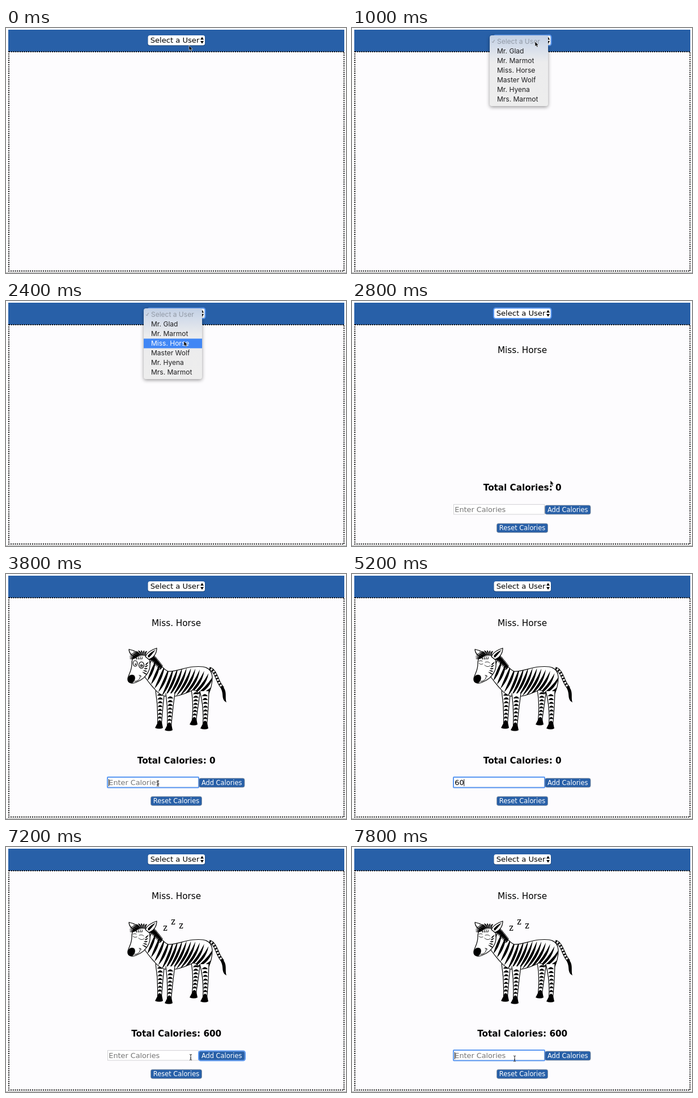
An HTML page for the animation above (8 s loop, 600 by 433 pixels).

```html
<!DOCTYPE html>
<html lang="en">
<head>
<meta charset="utf-8">
<title>Calorie tracker</title>
<style>
html, body { margin: 0; width: 100%; height: 100%; overflow: hidden; background: #fff; }
svg { display: block; width: 100vw; height: 100vh; }
text { font-family: "DejaVu Sans", Verdana, sans-serif; white-space: pre; }
.menu text { font: 12px Inter, Arial, sans-serif; }
.menu { filter: drop-shadow(0 2px 3px rgba(0, 0, 0, .4)); }
.z { font: 16px "Noto Serif", serif; }
.button { fill: #2860a8; stroke: #8d949e; stroke-width: .8; }
.label { font-size: 11.4px; fill: #fff; text-anchor: middle; }
.ring { fill: none; stroke: #5a98f2; stroke-width: 2; }
.line { fill: none; stroke: #000; stroke-linecap: round; }
.skin { fill: #fff; stroke: #000; stroke-width: 1.2; stroke-linejoin: round; }
</style>
</head>
<body>
<svg viewBox="0 0 600 433" preserveAspectRatio="none">
  <defs>
    <linearGradient id="frost" x1="0" y1="0" x2="0" y2="1">
      <stop offset="0" stop-color="#c3d0e4"/>
      <stop offset=".15" stop-color="#d3dcea"/>
      <stop offset=".38" stop-color="#ececed"/>
      <stop offset="1" stop-color="#ededed"/>
    </linearGradient>
    <clipPath id="bodyClip"><path id="bodyEdge"/></clipPath>
  </defs>
  <rect width="600" height="433" fill="#fff"/>
  <rect x="4" y="3" width="593" height="39" fill="#2860a8"/>
  <rect x="5" y="42" width="591.5" height="387.5" fill="#fdfcfe"/>
  <rect x="5" y="42" width="591.5" height="387.5" fill="none" stroke="#000" stroke-width="1.9" stroke-dasharray="1.9 1.9"/>
  <path d="M0 432.5H600" stroke="#aaa"/>

  <rect x="250" y="13.5" width="101.5" height="18" rx="3.5" fill="#000" opacity=".3"/>
  <rect x="250.5" y="13" width="100.5" height="17.5" rx="3.5" fill="#fff"/>
  <rect id="selectRing" class="ring" x="250" y="12.5" width="101.5" height="18.5" rx="3.5"/>
  <text x="254.7" y="26" font-size="13.1">Select a User</text>
  <path d="M343 20.5L346 15.8L349 20.5ZM343 23L346 27.7L349 23Z"/>

  <g id="page">
    <text x="300.5" y="92" font-size="15.2" text-anchor="middle">Miss. Horse</text>
    <g id="zebra"></g>
    <text id="total" x="300.7" y="335" font-size="15.2" font-weight="bold" text-anchor="middle"></text>
    <rect x="179.5" y="359.5" width="160" height="17.5" fill="#fff" stroke="#d2d2d6"/>
    <rect id="inputRing" class="ring" x="179" y="359" width="161" height="18.5" rx="1"/>
    <text id="entry" x="181.3" y="373.3" font-size="12.8"></text>
    <path id="caret" d="M0 362.5V375" stroke="#000" stroke-width=".9"/>
    <rect class="button" x="340.5" y="361" width="80.5" height="16" rx="3"/>
    <rect id="addRing" class="ring" x="340" y="360.5" width="82" height="17" rx="3.5"/>
    <text class="label" x="380.7" y="373.2">Add Calories</text>
    <rect class="button" x="255.5" y="393.2" width="90" height="16" rx="3"/>
    <text class="label" x="300.5" y="405.3">Reset Calories</text>
  </g>

  <g id="menu" class="menu"></g>
  <path id="arrow" d="M0 0V8.6L2 6.8L3.5 10L5.1 9.3L3.7 6.3H6.2Z" stroke="#fff" stroke-width=".6"/>
  <path id="beam" d="M-2 -5Q0 -5 0 -3.5Q0 -5 2 -5M0 -3.5V3.5M-2 5Q0 5 0 3.5Q0 5 2 5M-1 1.5H1" fill="none" stroke="#222"/>
</svg>
<script>
const LOOP = 8000, STEP = 200, ROW = 17;
const $ = id => document.getElementById(id);
const show = (id, on) => { $(id).style.display = on ? "" : "none"; };
const mix = (a, b, k) => a + (b - a) * k;
const ease = k => k * k * (3 - 2 * k);
const between = (t, a, b) => t >= a && t < b;
const shape = (cls, d) => `<path class="${cls}" d="${d}"/>`;

// Joins n path pieces; make gets the position k from 0 to 1.
const repeat = (n, make) => Array.from({ length: n }, (_, i) => make(i / (n - 1))).join("");

// Tapered stripe along a quadratic curve; w is its widest point.
function stripe(x1, y1, cx, cy, x2, y2, w) {
  const len = Math.hypot(x2 - x1, y2 - y1);
  const nx = (y1 - y2) / len * w, ny = (x2 - x1) / len * w;
  return `M${x1} ${y1}Q${cx + nx} ${cy + ny} ${x2} ${y2}Q${cx - nx} ${cy - ny} ${x1} ${y1}Z`;
}

// Tapering striped leg, open at the top so that it merges with the body.
function leg(x1, y1, x2, y2, bend) {
  const mx = (x1 + x2) / 2 + bend, my = (y1 + y2) / 2;
  const sides = `M${x1 - 8} ${y1}Q${mx - 4} ${my} ${x2 - 3.5} ${y2}H${x2 + 3.5}Q${mx + 4} ${my} ${x1 + 8} ${y1}`;
  const bands = repeat(8, k => {
    const u = mix(.14, .95, k), x = mix(mix(x1, mx, u), mix(mx, x2, u), u);
    const y = mix(y1, y2, u), half = mix(6.5, 3.5, Math.sqrt(u));
    return stripe(x - half, y + 1, x, y - 3, x + half, y + 1, 3.6);
  });
  const hoof = `M${x2 - 3} ${y2 - 2}H${x2 + 4}L${x2 + 6} ${y2 + 8}Q${x2} ${y2 + 11} ${x2 - 8} ${y2 + 8}Z`;
  return shape("skin", sides) + shape("", bands + hoof);
}

// Stripes sweep from the neck to the rump, leaning back towards the tail.
const coat = () => repeat(16, k => {
  const x1 = mix(257, 373, k), y1 = 147 + 18 * Math.min(1, 4 * k) + 24 * k ** 6;
  const x2 = mix(243, 338, k), y2 = 182 + 34 * Math.min(1, 3 * k);
  return stripe(x1, y1, (x1 + x2) / 2 + 9 * k, (y1 + y2) / 2 + 4, x2, y2, 4.5);
});

const mane = () => repeat(14, k => {
  const x = mix(251, 273, k), y = mix(145, 165, k ** 1.3);
  return stripe(x - 3, y + 5, x + 2, y, x + 3, y - 9 + 4 * k, 2.8);
});

const forelock = () => repeat(10, k => {
  const a = mix(2.9, 5.2, k), x = 239 + 22 * Math.cos(a), y = 147 + 12 * Math.sin(a);
  return stripe(mix(232, 246, k), 146, mix(x, 239, .4), y, x, y, 2.3);
});

const faceMarks = () =>
  repeat(5, k => stripe(mix(252, 248, k), mix(155, 178, k), 247, mix(160, 176, k), mix(246, 240, k), mix(161, 173, k), 2)) +
  repeat(4, k => stripe(mix(230, 241, k), 146, mix(230, 240, k), 149, mix(231, 239, k), 152, 1.6));

function drawZebra() {
  const body = `M258 147C270 156 277 169 286 172C300 173 312 166 330 164C350 162 363 165 364 182
    C364 196 361 203 358 211H340Q335 205 330 205C320 210 310 214 299 216H281
    C272 214 266 208 262 203C256 197 251 190 245 182Z`;
  const tail = "M359 167C372 171 372 192 383 202";
  const tailStroke = (color, width, dash = "none") =>
    `<path d="${tail}" fill="none" stroke="${color}" stroke-width="${width}" stroke-dasharray="${dash}"/>`;
  $("bodyEdge").setAttribute("d", body);
  $("zebra").innerHTML =
    leg(272, 206, 271, 264, 1) + leg(335, 204, 332, 258, 2) +
    tailStroke("#000", 5.5) + tailStroke("#fff", 3.5) + tailStroke("#000", 4.5, "2.5 3") +
    shape("", "M382 198C391 208 386 216 389 227C379 221 385 213 379 202Z") +
    shape("skin", body) +
    `<g clip-path="url(#bodyClip)">${shape("", coat())}</g>` +
    leg(290, 211, 288, 268, 1) + leg(350, 207, 351, 265, 3) +
    shape("", mane()) +
    shape("skin", "M230 147C221 145 217 139 217 133C226 135 233 139 235 145Z") +
    shape("skin", `M226 146C232 141 246 141 252 148C256 160 254 171 247 179
      C241 187 235 189 228 192C220 195 214 191 215 184C217 176 222 171 222 159C222 153 223 149 226 146Z`) +
    shape("skin", "M246 146C249 138 257 134 266 131C266 140 261 148 252 151Z") +
    shape("", "M250 145C253 140 258 137 264 134C260 139 257 143 252 148Z") +
    shape("", faceMarks() + forelock()) +
    shape("", "M215 186C215 180 221 176 226 179C230 183 227 191 222 193C217 193 214 190 215 186Z") +
    shape("line", "M227 190C234 189 237 185 237 180M235 179Q238 179 239 181") +
    `<g id="awake"><ellipse class="skin" cx="228" cy="158" rx="3.7" ry="5"/>
      <ellipse class="skin" cx="239" cy="161" rx="4.6" ry="5.6"/>
      <circle class="line" cx="239" cy="162" r="2.2"/>
      <circle cx="228.5" cy="159.5" r="1.3"/><circle cx="239" cy="162" r="1"/></g>
    <g id="asleep" stroke-width=".8">${shape("line", "M224 158Q227 161 231 159M234 161Q239 166 244 162M224 154Q227 152 230 154M235 156Q240 154 243 157")}</g>` +
    [0, 1, 2].map(i => `<text class="z" id="z${i}" x="${277 + 14 * i}" y="${148 - 2 * i - 9 * (i % 2)}">z</text>`).join("");
}

function drawMenu() {
  const users = ["Select a User", "Mr. Glad", "Mr. Marmot", "Miss. Horse", "Master Wolf", "Mr. Hyena", "Mrs. Marmot"];
  $("menu").innerHTML =
    `<rect x="243" y="13" width="103" height="125" rx="4" fill="url(#frost)"/>
     <rect id="hover" x="243" width="103" height="${ROW}" fill="#4187f5"/>
     <path d="M247 24L248.7 26L251.5 21" fill="none" stroke="#8c939e"/>` +
    users.map((name, i) => `<text x="256" y="${27.8 + i * ROW}">${name}</text>`).join("");
}

const moves = [
  { from: 0, to: 400, x: 323, y: 24 },
  { from: 1000, to: 2000, x: 314, y: 71 },
  { from: 2600, to: 2800, x: 350, y: 317 },
  { from: 2800, to: 3600, x: 268, y: 370 },
  { from: 6000, to: 6600, x: 365, y: 369 },
  { from: 6800, to: 7600, x: 287, y: 374 }
];

function pointerAt(t) {
  let x = 323, y = 31;
  for (const move of moves.filter(m => t > m.from)) {
    const k = ease(Math.min(1, (t - move.from) / (move.to - move.from)));
    x = mix(x, move.x, k);
    y = mix(y, move.y, k);
  }
  return [x, y];
}

function drawPointer(t, x, y) {
  const overInput = t >= 2800 && x > 179 && x < 340 && y > 359 && y < 378;
  const typing = between(t, 5000, 6000);
  show("arrow", !overInput && !typing);
  show("beam", overInput && !typing);
  for (const id of ["arrow", "beam"]) $(id).setAttribute("transform", `translate(${x} ${y})`);
}

function drawInput(t) {
  const keys = [5000, 5200, 5600];
  const typed = t < 7000 ? "600".slice(0, keys.filter(k => t >= k).length) : "";
  const focused = between(t, 3600, 6800) || t >= 7600;
  const lastInput = [3600, ...keys, 7600].filter(k => t >= k).pop();
  $("entry").textContent = typed || "Enter Calories";
  $("entry").setAttribute("fill", typed ? "#000" : "#757575");
  $("caret").setAttribute("transform", `translate(${181.5 + typed.length * 8.14} 0)`);
  show("caret", focused && Math.floor((t - lastInput) / 500) % 2 === 0);
  show("inputRing", focused);
  show("addRing", between(t, 6800, 7600));
}

function render(time) {
  const t = Math.floor(time % LOOP / STEP) * STEP;
  const [x, y] = pointerAt(t);
  const row = Math.floor((y - 15) / ROW);

  show("menu", between(t, 1000, 2800));
  show("hover", row > 0);
  $("hover").setAttribute("y", 15.5 + row * ROW);
  document.querySelectorAll("#menu text").forEach((el, i) =>
    el.setAttribute("fill", i === 0 ? "#929aa6" : i === row ? "#fff" : "#1f1f21"));

  show("selectRing", between(t, 1000, 3600));
  show("page", t >= 2800);
  show("zebra", t >= 3000);
  show("awake", t < 4800);
  show("asleep", t >= 4800);
  for (let i = 0; i < 3; i++) show("z" + i, t >= 5400 + 500 * i);
  $("total").textContent = "Total Calories: " + (t >= 7000 ? 600 : 0);
  drawInput(t);
  drawPointer(t, x, y);
}

drawZebra();
drawMenu();
const start = performance.now();
function tick() {
  render(performance.now() - start);
  requestAnimationFrame(tick);
}
tick();
</script>
</body>
</html>
```
